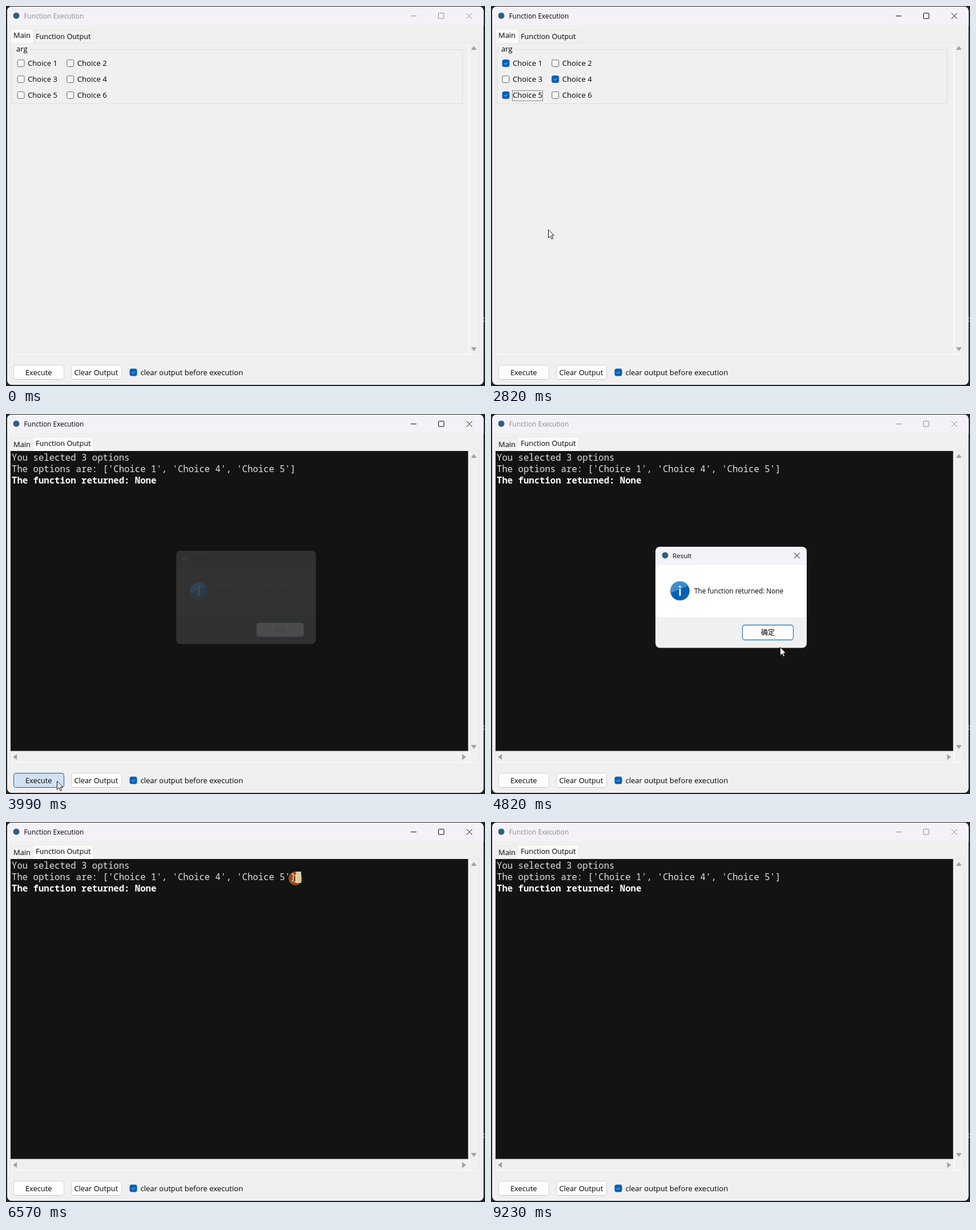
An HTML page with a canvas that plays this animation: 839x667 px, repeating every 9300 ms.

```html
<!DOCTYPE html>
<html lang="en">
<head>
<meta charset="utf-8">
<title>Function Execution</title>
<style>
html, body { margin: 0; width: 100%; height: 100%; overflow: hidden; background: #202020; }
canvas { display: block; width: 839px; height: 667px; }
</style>
</head>
<body>
<canvas id="stage" width="839" height="667"></canvas>
<script>
const LOOP = 9300;
const ctx = document.getElementById('stage').getContext('2d');
const UI = '"Open Sans", "Noto Sans", sans-serif';
const MONO = '"Noto Sans Mono", monospace';
const BLUE = '#005fb8', INK = '#000', PANEL = '#f0f0f0', BAR = '#f4f2f8';
const CELL = 9.39;
const LINE2 = "The options are: ['Choice 1', 'Choice 4', 'Choice 5']";

// Pointer path: time, x, y
const PATH = [
  [70, -15, 565], [900, 66, 104], [1320, 66, 104], [1680, 136, 132],
  [1850, 136, 132], [2210, 62, 159], [2400, 62, 159], [2820, 100, 392],
  [3130, 160, 640], [3480, 89, 644], [4470, 89, 644], [4820, 506, 409],
  [5050, 490, 385], [5400, 490, 385], [6300, 520, 98], [6430, 520, 98],
  [6570, 507, 99], [7160, 11, 98], [7600, 11, 98], [7900, 360, 212],
  [8090, 360, 212], [8420, -15, 600]
];
const PRESSES = [[940, 1110], [1640, 1750], [2230, 2310], [3570, 3800],
  [5180, 5300], [6420, 7230], [8030, 8090]];

const within = (t, a, b) => t >= a && t < b;
const ramp = (t, a, b) => Math.min(1, Math.max(0, (t - a) / (b - a)));
const ease = u => u * u * (3 - 2 * u);

function pointer(t) {
  if (t < PATH[0][0] || t >= PATH[PATH.length - 1][0]) return null;
  const i = PATH.findIndex(p => p[0] > t);
  const [t0, x0, y0] = PATH[i - 1], [t1, x1, y1] = PATH[i];
  const u = ease((t - t0) / (t1 - t0));
  return { x: x0 + (x1 - x0) * u, y: y0 + (y1 - y0) * u };
}

function text(s, x, y, size, color = INK, family = UI, weight = 400) {
  ctx.font = `${weight} ${size}px ${family}`;
  ctx.fillStyle = color;
  ctx.fillText(s, x, y);
}

function rect(x, y, w, h, color) {
  ctx.fillStyle = color;
  ctx.fillRect(x, y, w, h);
}

function box(x, y, w, h, r, fill, stroke, lw = 1) {
  ctx.beginPath();
  ctx.roundRect(x, y, w, h, r);
  if (fill) { ctx.fillStyle = fill; ctx.fill(); }
  if (stroke) { ctx.strokeStyle = stroke; ctx.lineWidth = lw; ctx.stroke(); }
}

function line(points, color, lw = 1) {
  ctx.beginPath();
  points.forEach(([x, y]) => ctx.lineTo(x, y));
  ctx.strokeStyle = color;
  ctx.lineWidth = lw;
  ctx.stroke();
}

function disc(x, y, r, color) {
  ctx.beginPath();
  ctx.arc(x, y, r, 0, 7);
  ctx.fillStyle = color;
  ctx.fill();
}

function dotted(x, y, w, h) {
  ctx.setLineDash([1, 1]);
  box(x + .5, y + .5, w, h, 0, null, '#222');
  ctx.setLineDash([]);
}

function cross(x, y, color) {
  line([[x - 5, y - 5], [x + 5, y + 5]], color);
  line([[x + 5, y - 5], [x - 5, y + 5]], color);
}

function triangle(x, y, angle) {
  ctx.save();
  ctx.translate(x, y);
  ctx.rotate(angle);
  ctx.beginPath();
  ctx.moveTo(0, -3); ctx.lineTo(4, 2.5); ctx.lineTo(-4, 2.5);
  ctx.closePath();
  ctx.lineJoin = 'round';
  ctx.fillStyle = ctx.strokeStyle = '#a3a3a3';
  ctx.lineWidth = 1.2;
  ctx.fill(); ctx.stroke();
  ctx.restore();
}

function checkbox(cx, cy, on) {
  box(cx - 6, cy - 6.5, 12, 12, 2.5, on ? BLUE : '#f6f6f6', on ? BLUE : '#666');
  if (on) line([[cx - 2.8, cy - .3], [cx - .8, cy + 1.5], [cx + 2.8, cy - 2]], '#d5e5f3');
}

function button(x, label, lx, hover, focus) {
  box(x + .5, 630.5, 88, 25, 4, hover ? '#d0e1f2' : '#fdfdfd', hover || focus ? BLUE : '#d2d2d2');
  if (!hover && !focus) line([[x + 4, 655.5], [x + 85, 655.5]], '#c2c2c2');
  if (focus) dotted(x + 2, 632, 84, 21);
  text(label, lx, 648, 12.8);
}

function titleBar(t) {
  const active = ramp(t, 940, 1180) - ramp(t, 3990, 4200) + ramp(t, 5340, 5450) - ramp(t, 9130, 9225);
  const v = Math.round(140 * (1 - active)), color = `rgb(${v},${v},${v})`;
  rect(0, 0, 839, 34, BAR);
  disc(18, 17, 5.5, '#2f5f86');
  text('Function Execution', 31.5, 21.5, 11.85, color);
  line([[709, 17.5], [719, 17.5]], color);
  box(757.5, 12.5, 9.5, 9.5, 1, null, color);
  cross(811.5, 17.5, color);
}

function tabs(output) {
  rect(7, 64, 822, 1, '#e4e4e4');
  const tab = (x, w, on) => on
    ? box(x + .5, 40.5, w, 25, 0, '#f9f9f9', '#e9e9e9')
    : box(x + .5, 42.5, w, 22, 0, '#f1f1f1', '#e4e4e4');
  if (output) { tab(10, 36, false); tab(46, 107, true); }
  else { tab(49, 102, false); tab(8, 40, true); }
  text('Main', 13, output ? 58 : 56, 12.9);
  text('Function Output', 52, output ? 56 : 58, 12.65);
}

function mainPage(t) {
  box(10.5, 76.5, 789, 95, 0, null, '#dcdcdc');
  rect(16, 75, 26, 3, PANEL);
  text('arg', 18, 80, 13);
  const toggled = { 0: 1110, 3: 1750, 4: 2310 };
  for (let i = 0; i < 6; i++) {
    const x = 26 + (i % 2) * 86.7, y = 101 + (i >> 1) * 28;
    checkbox(x, y, t >= toggled[i]);
    text(`Choice ${i + 1}`, x + 12, y + 4, 13.1);
  }
  if (within(t, 1110, 1750)) dotted(37, 92, 53, 18);
  if (within(t, 1750, 2310)) dotted(124, 120, 53, 18);
  if (within(t, 2310, 3570)) dotted(37, 148, 53, 18);
}

function consolePage(t, p) {
  rect(8, 65, 802, 527, '#8a8a8a');
  rect(8, 65, 801, 526, '#131313');
  const lineOut = (s, row, color, weight) => text(s, 10, 82 + row * 20, 15.65, color, MONO, weight);
  lineOut('You selected 3 options', 0, '#e2e2e2');
  lineOut('The function returned: None', 2, '#fff', 700);

  const pressed = within(t, 6420, 7230);
  if (pressed) disc(p.x, p.y, 12, '#964914');
  lineOut(LINE2, 1, '#e2e2e2');
  if (within(t, 6460, 8060)) {
    const col = t < 7160 ? Math.max(0, Math.round((p.x - 10) / CELL)) : 0;
    if (col <= LINE2.length) {
      const x = 10 + col * CELL;
      ctx.save();
      ctx.beginPath();
      ctx.rect(x, 87, 517 - x, 20);
      ctx.clip();
      rect(x, 87, 517 - x, 20, '#d2d1d2');
      if (pressed) disc(p.x, p.y, 12, '#dccf9c');
      lineOut(LINE2, 1, '#f6f6f6');
      ctx.restore();
    }
  }
  // Insertion caret
  if (within(t, 7160, 7460) || within(t, 7760, 8060)) rect(10, 87, 2, 20, '#fff');
  if (within(t, 8060, 8960)) rect(10, 126, 2, 20, '#fff');
}

function dialog(t) {
  const alpha = ramp(t, 3960, 4200) * (1 - ramp(t, 5320, 5480));
  if (!alpha) return;
  const scale = .92 + .08 * ease(alpha);
  ctx.save();
  ctx.globalAlpha = alpha;
  ctx.translate(420.5, 321.5);
  ctx.scale(scale, scale);
  ctx.translate(-420.5, -321.5);
  ctx.beginPath();
  ctx.roundRect(288, 233, 265, 177.5, 8);
  ctx.clip();
  rect(288, 233, 265, 32, '#f2f2f8');
  rect(288, 265, 265, 92, '#fff');
  rect(288, 357, 265, 54, PANEL);
  disc(305, 248, 5.5, '#2f5f86');
  text('Result', 318, 252.5, 11.6);
  cross(536, 248.5, INK);

  disc(331, 310.5, 16.8, '#0560b6');
  ctx.beginPath();
  ctx.arc(331, 310.5, 16.8, Math.PI * .93, Math.PI * 1.82);
  ctx.fillStyle = '#408ccb';
  ctx.fill();
  disc(331, 303, 1.7, '#fff');
  rect(329.7, 307, 2.6, 12, '#fff');
  text('The function returned: None', 356, 314.5, 11.75);

  const hover = within(t, 4960, 5400);
  box(440.5, 370.5, 89, 26, 4, hover ? '#e3effa' : '#fdfdfd', '#2b82c9', 1.3);
  text('确定', 473, 388, 12, INK, '"Noto Sans CJK SC", "Noto Sans CJK", sans-serif');
  ctx.restore();
}

function arrow(x, y) {
  const shape = [[0, 0], [0, 14.5], [3.4, 11.3], [5.8, 16.6], [8, 15.6], [5.7, 10.5], [10, 10.2]];
  ctx.beginPath();
  shape.forEach(([dx, dy]) => ctx.lineTo(x + dx, y + dy));
  ctx.closePath();
  ctx.lineJoin = 'miter';
  ctx.fillStyle = '#fff';
  ctx.strokeStyle = '#111';
  ctx.lineWidth = 1;
  ctx.fill(); ctx.stroke();
}

function ibeam(x, y) {
  x = Math.round(x) + .5;
  y = Math.round(y);
  line([[x, y - 6], [x, y + 7]], '#e8e8e8');
  for (const dy of [-5.5, 6.5]) line([[x - 3, y + dy], [x + 3, y + dy]], '#e8e8e8');
}

function drawPointer(t, p) {
  if (!p) return;
  const overText = t > 5480 && p.x > 8;
  const pressed = PRESSES.some(([a, b]) => within(t, a, b));
  if (pressed && !within(t, 6420, 7230)) disc(p.x, p.y, 12, t > 8000 ? '#964914' : 'rgba(240,205,120,.7)');
  if (overText) ibeam(p.x, p.y);
  else arrow(p.x + .5, p.y + .5);
}

function render(t) {
  const p = pointer(t), output = t >= 3990;
  rect(0, 0, 839, 667, '#222');
  line([[839, 547.5], [836, 547.5], [836, 553.5], [839, 553.5]], '#aaa');
  ctx.save();
  ctx.beginPath();
  ctx.roundRect(2, 1, 834.5, 664, 8);
  ctx.clip();
  rect(0, 0, 839, 667, PANEL);
  titleBar(t);

  box(7.5, 64.5, 821, 547, 0, null, '#e4e4e4');
  rect(8, 611, 821, 1, '#fbfbfb');
  rect(810, 65, 1.5, 546, '#fbfbfb');
  tabs(output);
  if (output) consolePage(t, p);
  else mainPage(t);
  triangle(819.5, 74, 0);
  triangle(819.5, output ? 584 : 602, Math.PI);
  if (output) {
    triangle(16, 602, -Math.PI / 2);
    triangle(802, 602, Math.PI / 2);
  }

  const over = (x, a, b) => p && within(t, a, b) && p.y > 630 && p.x > x && p.x < x + 89;
  button(13, 'Execute', 34, over(13, 3130, 4500), within(t, 3570, 3990) || within(t, 5380, 6430));
  button(114, 'Clear Output', 119.5, over(114, 3000, 3500), false);
  checkbox(223, 643.5, true);
  text('clear output before execution', 235.5, 648, 13.05);
  dialog(t);
  drawPointer(t, p);
  ctx.restore();
}

const start = performance.now();
function tick() {
  render((performance.now() - start) % LOOP);
  requestAnimationFrame(tick);
}
tick();
</script>
</body>
</html>
```
